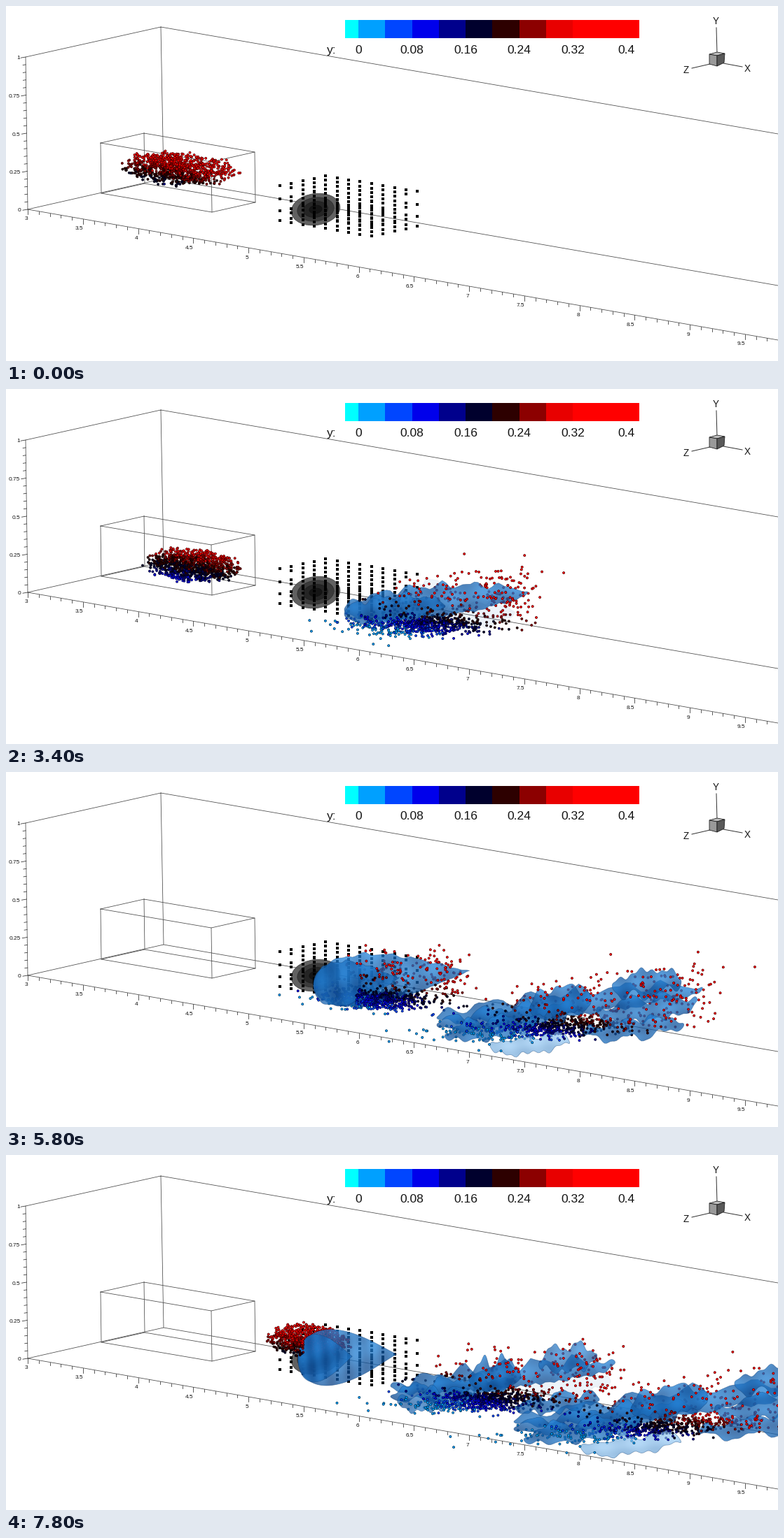
Write a matplotlib script that moves like this. It is 1102 by 508 pixels and loops after 8 s.

```python
import numpy as np
import matplotlib.pyplot as plt
from matplotlib.animation import FuncAnimation
from matplotlib.patches import Ellipse, Polygon, Rectangle

W, H = 1102, 508
FRAMES, STEP = 40, 200
PX = 0.72  # points per pixel at 100 dpi

plt.rcParams["font.family"] = "Liberation Sans"
fig = plt.figure(figsize=(W / 100, H / 100), dpi=100, facecolor="white")
ax = fig.add_axes([0, 0, 1, 1])
ax.set_xlim(0, W)
ax.set_ylim(H, 0)
ax.axis("off")

BANDS = np.array([(0, 255, 255), (0, 160, 255), (0, 70, 255), (0, 0, 235), (0, 0, 140),
                  (0, 0, 45), (45, 0, 0), (140, 0, 0), (232, 0, 0), (255, 0, 0)]) / 255


def ease(t, start, end):
    u = np.clip((t - start) / (end - start), 0, 1)
    return u * u * (3 - 2 * u)


# ---- fixed scene ----
def line(*pts, color="0.3", width=0.8):
    x, y = zip(*pts)
    ax.plot(x, y, color=color, lw=width * PX, zorder=1)


def label(x, y, text, size, ha="center"):
    ax.text(x, y, text, size=size * PX, ha=ha, va="center_baseline", color="0.08")


def draw_room():
    line((221, 30), (28, 73), (31, 291), (225, 247), (221, 30), (W, 183))
    line((225, 247), (W, 400))
    line((31, 291), (W, 478))
    for i in range(69):
        x, y = 31 + 15.75 * i, 291 + 2.752 * i
        major = i % 5 == 0
        line((x, y), (x, y + (7 if major else 4)), color="0.2")
        if major:
            value = 3 + i / 10
            dx = -2 if value % 1 == 0 else -5.5
            label(x + dx, y + 13, f"{value:g}", 8.3)
    for i in range(21):
        x, y = 31 - 0.15 * i, 291 - 10.9 * i
        major = i % 5 == 0
        line((x, y), (x - (7 if major else 4), y + (1.2 if major else 0.6)), color="0.2")
        if major:
            label(21 - 0.05 * i, y + 1, f"{i / 20:g}", 8.3, "right")


def draw_box():
    front = [(135, 196), (293, 223), (294, 295), (136, 268)]
    back = [(197, 182), (355, 209), (356, 281), (198, 254)]
    for face in (front, back):
        line(*face, face[0])
    for a, b in zip(front, back):
        line(a, b)


def draw_legend():
    edges = [484] + [503 + 38.25 * i for i in range(9)] + [904]
    for left, right, color in zip(edges, edges[1:], BANDS):
        ax.add_patch(Rectangle((left, 20), right - left, 26, fc=color, lw=0))
    label(465, 62, "y:", 17.5)
    for i in range(6):
        label(503 + 76.5 * i, 62, f"{0.08 * i:g}", 17.5)


def draw_triad():
    line((1014, 31), (1015, 68), color="0.2", width=1)
    line((979, 89), (1005, 83), color="0.2", width=1)
    line((1024, 82), (1051, 87), color="0.2", width=1)
    faces = [(((1004, 69), (1015, 66), (1026, 68), (1015, 71)), "0.75"),
             (((1004, 69), (1015, 71), (1015, 86), (1004, 83)), "0.6"),
             (((1015, 71), (1026, 68), (1025, 81), (1015, 86)), "0.35")]
    for pts, tone in faces:
        ax.add_patch(Polygon(pts, fc=tone, ec="0.1", lw=0.8 * PX, zorder=2))
    for x, y, name in ((1013, 20, "Y"), (971, 91, "Z"), (1058, 88, "X")):
        label(x, y, name, 13.5)


def draw_obstacle():
    for scale, tone in ((1, 0.33), (0.75, 0.22), (0.5, 0.14), (0.26, 0.08)):
        ax.add_patch(Ellipse((442, 291), 70 * scale, 45 * scale, angle=-8, fc=str(tone),
                             ec=str(tone * 0.8), lw=0.6, alpha=0.92, zorder=2))
    a, b, drop = np.meshgrid(np.arange(9), np.arange(5), (0, 19, 36, 50))
    ax.scatter(391 + 16.35 * (a + b), 257 + 2.8 * a - 3.5 * b + drop,
               s=(4.2 * PX) ** 2, marker="s", color="black", lw=0, zorder=3)


# ---- wake of one pulse: a band that leaves the obstacle and stretches ----
STARTS = (0, 3200, 6200)


def wake(age, s):
    """Point at fraction s between the band's tail and head."""
    late = max(age - 2200, 0)
    tail, head = 417 + 0.055 * late, 495 + 0.104 * (age - 1000)
    left = 292 + 0.015 * max(age - 1800, 0)
    right = 285 + 0.008 * max(age - 2600, 0)
    return tail + (head - tail) * s, left + (right - left) * s


# strands of the band: from, to, drop in px, relative thickness, age at birth
STRANDS = [(0, 1, 0, 1, 500), (0, 0.55, 10, 0.85, 900), (0.35, 0.58, -3, 1.35, 3400),
           (0.03, 0.38, 24, 0.9, 4300), (0.66, 0.92, -17, 1.1, 4300),
           (0.6, 0.98, 20, 1, 4600), (0.55, 0.93, 46, 0.8, 3400), (0.2, 0.5, 52, 0.8, 4900)]


def texture(phase, folds, pale):
    gx, gy = np.meshgrid(np.linspace(0, 1, 90), np.linspace(0, 1, 36))
    wave = np.sin(folds * gx + 4 * gy + phase) * np.sin(6 * gy - 0.6 * folds * gx + 2 * phase)
    light = np.clip(0.72 - 0.4 * gy + 0.32 * wave, 0, 1)[..., None]
    low, high = ((90, 150, 205), (150, 205, 250)) if pale else ((12, 68, 136), (38, 136, 222))
    return ((1 - light) * np.array(low) + light * np.array(high)) / 255


class Strand:
    s = (1 - np.cos(np.linspace(0, np.pi, 70))) / 2

    def __init__(self, start, order, begin, end, drop, thick, birth):
        self.start, self.birth = start, birth
        self.along = begin + (end - begin) * self.s
        self.drop, self.thick = drop, thick
        pale = drop > 50
        self.opacity = 0.65 if pale else 0.76
        length = end - begin
        rng = np.random.default_rng(order + start)
        self.bend, self.swell = (self.noise(rng, 1 + 5 * length) for _ in range(2))
        z = 5 + order / 100
        self.edge = Polygon([(0, 0), (1, 0), (1, 1)], fc="none", ec=(0.05, 0.22, 0.42),
                            lw=0.8 * PX, zorder=z)
        ax.add_patch(self.edge)
        self.fill = ax.imshow(texture(order * 1.3, 7 + 14 * length, pale), aspect="auto",
                              interpolation="bilinear", extent=(0, 1, 1, 0), zorder=z)
        self.fill.set_clip_path(self.edge)

    def noise(self, rng, waves):
        return sum(np.sin(2 * np.pi * (waves * k * self.s + rng.uniform())) / k for k in (1, 1.7, 2.9))

    def outline(self, age):
        spread = ease(age, 1800, 4800)
        x, y = wake(age, self.along)
        y = y + spread * (self.drop + 3.5 * self.bend)
        # a round bulb turns into a teardrop, then into an even band
        p, q = 0.5, 0.5 + 0.65 * (ease(age, 1000, 1700) - ease(age, 2600, 3800))
        peak = p / (p + q)
        profile = (self.s / peak) ** p * ((1 - self.s) / (1 - peak)) ** q
        radius = 40 * ease(age, 300, 1000) - 24 * ease(age, 2200, 4000)
        half = radius * self.thick * profile * (1 + 0.22 * spread * self.swell)
        return np.r_[np.c_[x, y - half], np.c_[x, y + half][::-1]]

    def update(self, t):
        age = t - self.start
        fade = ease(age, self.birth - 100, self.birth + 400)
        for artist in (self.edge, self.fill):
            artist.set_visible(fade > 0)
        if fade == 0:
            return
        pts = self.outline(age)
        self.edge.set_xy(pts)
        (x0, y0), (x1, y1) = pts.min(0), pts.max(0)
        self.fill.set_extent((x0, x1, y1, y0))
        self.fill.set_alpha(self.opacity * fade)
        self.edge.set_alpha(0.55 * fade)


# ---- particle clouds: drift to the obstacle, then spread along the wake ----
class Cloud:
    def __init__(self, start, count, birth, dx, dy, half):
        rng = np.random.default_rng(start + 7)
        ball = rng.normal(size=(3, count))
        ball *= rng.uniform(size=count) ** 0.4 / np.linalg.norm(ball, axis=0)
        self.u, self.v, depth = ball + rng.normal(0, 0.05, (3, count))
        self.tint = 0.05 * depth
        self.start, self.birth = start, birth
        self.dx, self.dy, self.half = dx, dy, half
        self.layer = rng.uniform(size=count)
        # low stream, upper stream and the scattered tip
        group = rng.choice(3, count, p=(0.74, 0.15, 0.11))
        spot, width = np.array([0.4, 0.45, 0.87]), np.array([0.17, 0.2, 0.09])
        drop, height = np.array([20, -5, 8]), np.array([8, 15, 22])
        self.s = spot[group] + width[group] * rng.normal(size=count)
        self.drop = drop[group] + height[group] * rng.normal(size=count)
        self.drop += np.where(group == 0, 25 * self.s, 0)

    def at(self, t):
        age = t - self.start
        x = 247 + 0.097 * age + self.dx + self.half * self.u
        y = 233 + 0.018 * age + self.dy + 24 * self.v + 0.06 * self.half * self.u
        mix = ease(age, 1500, 2800)
        wx, wy = wake(age, self.s)
        x, y = x + mix * (wx - x), y + mix * (wy + self.drop - y)
        height = (297 + 0.19 * (x - 246) - y) / 218 + self.tint
        band = np.clip(np.floor(height / 0.04).astype(int) + 1, 1, 9)
        front = (x < 425) | ((x > 500) & (self.layer < 0.45))
        return np.c_[x, y], BANDS[band], front


def balls(z):
    return ax.scatter([], [], s=(3.1 * PX) ** 2, lw=0.7 * PX, zorder=z)


def paint(coll, pos, color):
    coll.set_offsets(pos)
    coll.set_facecolor(color)
    coll.set_edgecolor(color * 0.3)


def update(frame):
    t = frame * STEP
    alive = [c.at(t) for c in clouds if t >= c.birth]
    pos, color, front = (np.concatenate(a) for a in zip(*alive))
    paint(behind, pos[~front], color[~front])
    paint(ahead, pos[front], color[front])
    for s in strands:
        s.update(t)
    return [behind, ahead]


draw_room()
draw_box()
draw_legend()
draw_triad()
draw_obstacle()
behind, ahead = balls(4), balls(8)
strands = [Strand(start, i, *row) for start in STARTS for i, row in enumerate(STRANDS)]
clouds = [Cloud(STARTS[0], 1000, 0, 0, 0, 84),
          Cloud(STARTS[1], 1000, 3200, 0, 16, 69),
          Cloud(STARTS[2], 850, 6000, 27, 2, 60)]

anim = FuncAnimation(fig, update, frames=FRAMES, init_func=lambda: update(0),
                     interval=STEP, repeat=True, repeat_delay=0, blit=False)
plt.show()
```
